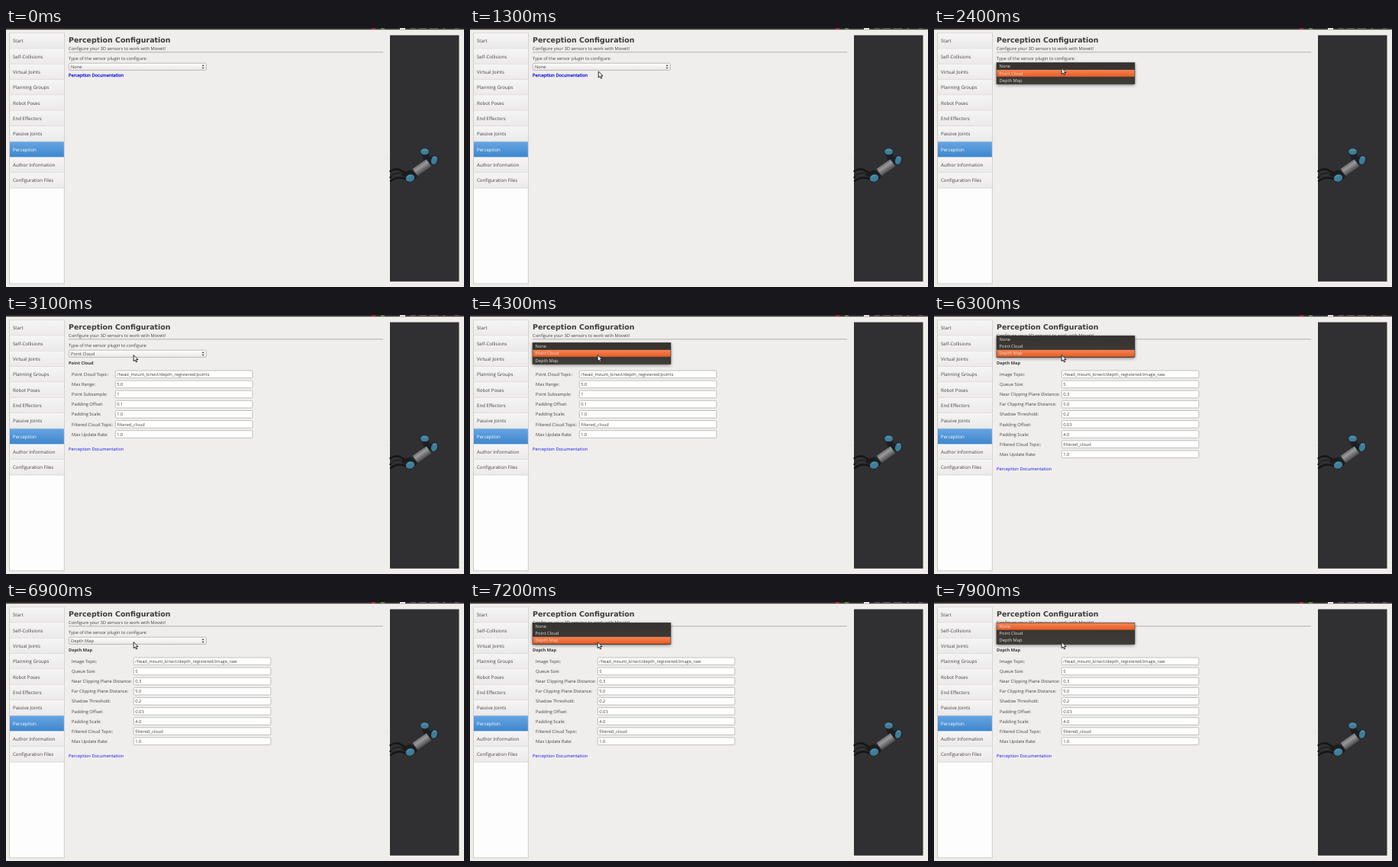
An HTML page for the animation above (8 s loop, 600 by 340 pixels).

```html
<!DOCTYPE html>
<html lang="en">
<head>
<meta charset="utf-8">
<title>Perception Configuration</title>
<style>
html, body { margin: 0; width: 100%; height: 100%; overflow: hidden; background: #efeeec; }
svg { display: block; width: 600px; height: 340px; }
text { font: 5.75px "Open Sans", "Noto Sans", sans-serif; fill: #45423f; text-rendering: geometricPrecision; white-space: pre; }
.title { font: bold 9.45px "DejaVu Sans", sans-serif; fill: #3d3b39; }
.head { font-weight: bold; font-size: 5.65px; fill: #3d3b39; }
.nav text { font-size: 6.13px; }
.link { fill: #1414e0; stroke: #1414e0; }
.popup text { fill: #e2ded8; }
.box { fill: #fff; stroke: #b5b1ad; stroke-width: .8; }
</style>
</head>
<body>
<svg viewBox="0 0 600 340" xmlns="http://www.w3.org/2000/svg">
  <defs>
    <linearGradient id="item" x2="0" y2="1"><stop stop-color="#f6f5f5"/><stop offset="1" stop-color="#ebe9ea"/></linearGradient>
    <linearGradient id="blue" x2="0" y2="1"><stop stop-color="#66a4e2"/><stop offset="1" stop-color="#3f86cc"/></linearGradient>
    <linearGradient id="combo" x2="0" y2="1"><stop stop-color="#fefefe"/><stop offset="1" stop-color="#eae8e6"/></linearGradient>
    <linearGradient id="orange" x2="0" y2="1"><stop stop-color="#f58453"/><stop offset="1" stop-color="#e75d27"/></linearGradient>
    <linearGradient id="dark" x2="0" y2="1"><stop stop-color="#35322f"/><stop offset="1" stop-color="#403c38"/></linearGradient>
    <linearGradient id="tube" gradientUnits="userSpaceOnUse" x1="541" y1="178" x2="548" y2="188"><stop stop-color="#6c6c6e"/><stop offset=".4" stop-color="#98989a"/><stop offset="1" stop-color="#4c4c4e"/></linearGradient>
    <filter id="blur" x="-10%" y="-40%" width="120%" height="180%"><feGaussianBlur stdDeviation="2"/></filter>
  </defs>
  <rect width="600" height="340" fill="#efeeec"/>

  <rect width="600" height="2.2" fill="#3a3734"/>
  <rect x="479" width="5" height="1.8" fill="#c8283c"/>
  <rect x="491" width="5" height="1.6" fill="#5f9a3c"/>
  <rect x="516" width="7" height="2" fill="#e4e2de"/>
  <path d="M530 .6h7M541 .6h10M555 .6h11M572 .6h3M588 .6h5" stroke="#77736e" stroke-width="1"/>

  <rect x="4.5" y="7" width="71.8" height="328.8" fill="#fefdfe" stroke="#c9c6c4" stroke-width=".9"/>
  <g class="nav" id="nav"></g>

  <text class="title" x="82" y="18.5">Perception Configuration</text>
  <text x="82" y="28.8">Configure your 3D sensors to work with Moveit!</text>
  <path d="M82 31.8H494" stroke="#aaa7a4" stroke-width=".9"/>
  <text x="82" y="42.2">Type of the sensor plugin to configure:</text>
  <rect x="82.4" y="46.2" width="180" height="9.2" rx="1.6" fill="url(#combo)" stroke="#b0aca8" stroke-width=".8"/>
  <path d="M256.5 50.1l1.6-2 1.6 2zM256.5 51.7l1.6 2 1.6-2z" fill="#4a4744"/>
  <text id="value" x="85" y="52.9"></text>
  <g id="form"></g>
  <text class="link" id="link" x="82">Perception Documentation</text>
  <circle cx="499" cy="171" r=".7" fill="#d2cfcc"/>

  <rect x="503" y="9.5" width="90.5" height="323.3" fill="#302f31"/>
  <g stroke-linecap="round" stroke-linejoin="round" fill="none">
    <path d="M503.5 188q8-5 14-1t10 4M503.5 196q7-7 20-3M504 201q8-7 19-3" stroke="#151516" stroke-width="2.4"/>
    <path d="M505 194.6q8-4 17-2" stroke="#4a4a4c" stroke-width=".9"/>
    <path d="M549 165l3 9 8-1" stroke="#1d1e20" stroke-width="8.5"/>
    <path d="M536 189.5L554 177" stroke="url(#tube)" stroke-width="11.5" stroke-linecap="butt"/>
    <path d="M521.5 192.5l8-3 6 5" stroke="#1b1c1e" stroke-width="6"/>
  </g>
  <g fill="#3f7d99" stroke="#1a1d20" stroke-width=".9">
    <ellipse cx="548.5" cy="162.2" rx="6" ry="4.6"/>
    <ellipse cx="561" cy="173.5" rx="4.4" ry="6.2" transform="rotate(18 561 173.5)"/>
    <ellipse cx="529.5" cy="197" rx="6.3" ry="5.2" transform="rotate(-20 529.5 197)"/>
  </g>
  <path d="M545 160.6q4-2 7 .4M559.6 170q2-2 3.6 1M525.6 196q2-3 6-2.4" fill="none" stroke="#62a0ba" stroke-width="1"/>

  <g class="popup" id="popup">
    <rect x="82" y="1.5" width="181" height="28" fill="#000" opacity=".5" filter="url(#blur)"/>
    <rect x="82" width="181" height="28.2" fill="url(#dark)" stroke="#2d2a28" stroke-width=".5"/>
    <rect id="mark" x="82.3" width="180.4" height="9" fill="url(#orange)"/>
  </g>
  <path id="cursor" d="M0 0V8.1L1.9 6.4 3.2 9.3 4.6 8.7 3.3 5.9H5.8Z" fill="#fff" stroke="#161616" stroke-width=".9" stroke-linejoin="round"/>
</svg>
<script>
const NS = "http://www.w3.org/2000/svg", LOOP = 8000;
const $ = id => document.getElementById(id);

function add(parent, tag, attrs, text) {
  const el = document.createElementNS(NS, tag);
  for (const k in attrs) el.setAttribute(k, attrs[k]);
  if (text) el.textContent = text;
  parent.appendChild(el);
  return el;
}
const show = (el, on) => el.setAttribute("visibility", on ? "visible" : "hidden");

const pages = ["Start", "Self-Collisions", "Virtual Joints", "Planning Groups", "Robot Poses",
  "End Effectors", "Passive Joints", "Perception", "Author Information", "Configuration Files"];
pages.forEach((name, i) => {
  const y = 7 + i * 20.33, on = name === "Perception";
  add($("nav"), "rect", { x: 5, y, width: 70.9, height: 20.33, fill: on ? "url(#blue)" : "url(#item)" });
  if (!on) add($("nav"), "path", { d: `M5 ${y + 20.1}H75.9`, stroke: "#d3d0cf", "stroke-width": .7 });
  add($("nav"), "text", { x: 9, y: y + 12.3, style: on ? "fill:#fff" : "" }, name);
});

const options = ["None", "Point Cloud", "Depth Map"];
options.forEach((name, i) => add($("popup"), "text", { x: 85.5, y: 7.1 + i * 9.1 }, name));

const common = [["Filtered Cloud Topic:", "filtered_cloud"], ["Max Update Rate:", "1.0"]];
const forms = [
  { x: 0, rows: [] },
  { x: 143, rows: [["Point Cloud Topic:", "/head_mount_kinect/depth_registered/points"],
    ["Max Range:", "5.0"], ["Point Subsample:", "1"], ["Padding Offset:", "0.1"],
    ["Padding Scale:", "1.0"], ...common] },
  { x: 167, rows: [["Image Topic:", "/head_mount_kinect/depth_registered/image_raw"],
    ["Queue Size:", "5"], ["Near Clipping Plane Distance:", "0.3"],
    ["Far Clipping Plane Distance:", "5.0"], ["Shadow Threshold:", "0.2"],
    ["Padding Offset:", "0.03"], ["Padding Scale:", "4.0"], ...common] }
];
const groups = forms.map(({ x, rows }, n) => {
  const g = add($("form"), "g", {});
  if (n) add(g, "text", { x: 82, y: 64.6, class: "head" }, options[n]);
  rows.forEach(([label, value], i) => {
    const y = 77.8 + i * 13.12;
    add(g, "text", { x: 86, y: y + 2.1 }, label);
    add(g, "rect", { class: "box", x: x + .3, y: y - 4.8, width: 179.6, height: 9.6, rx: 1.2 });
    add(g, "text", { x: x + 2.3, y: y + 2.1 }, value);
  });
  return g;
});

// [time, value] steps
const chosen = [[0, 0], [2700, 1], [4700, 2]];
const marked = [[0, 0], [2400, 1], [4400, 2], [7700, 1], [7800, 0]];
const menus = [[2000, 2700], [3900, 4700], [5000, 6400], [7100, LOOP]];
const path = [[1100, 64, 152], [1200, 176, 76], [1300, 168.3, 57], [1500, 167.2, 52.6]];

const step = (list, t) => list.filter(s => s[0] <= t).pop()[1];

function pointer(t) {
  const i = path.findIndex(p => p[0] > t);
  if (i < 0) return path[path.length - 1].slice(1);
  const a = path[i - 1], b = path[i], k = (t - a[0]) / (b[0] - a[0]);
  return [a[1] + (b[1] - a[1]) * k, a[2] + (b[2] - a[2]) * k];
}

function draw(t) {
  const sel = step(chosen, t), count = forms[sel].rows.length;
  $("value").textContent = options[sel];
  groups.forEach((g, i) => show(g, i === sel));
  $("link").setAttribute("y", count ? 98.9 + (count - 1) * 13.12 : 64.2);
  $("link").setAttribute("stroke-width", count ? 0 : .25);

  const menu = menus.find(([a, b]) => t >= a && t < b);
  show($("popup"), menu);
  if (menu) {
    $("popup").setAttribute("transform", `translate(0 ${45.4 - sel * 9.1})`);
    $("popup").setAttribute("opacity", Math.min(1, .5 + (t - menu[0]) / 200));
    $("mark").setAttribute("y", .4 + step(marked, t) * 9.1);
  }

  const moving = t >= path[0][0];
  show($("cursor"), moving);
  if (moving) $("cursor").setAttribute("transform", `translate(${pointer(t)})`);
}

const start = performance.now();
function tick() {
  draw((performance.now() - start) % LOOP);
  requestAnimationFrame(tick);
}
tick();
</script>
</body>
</html>
```
